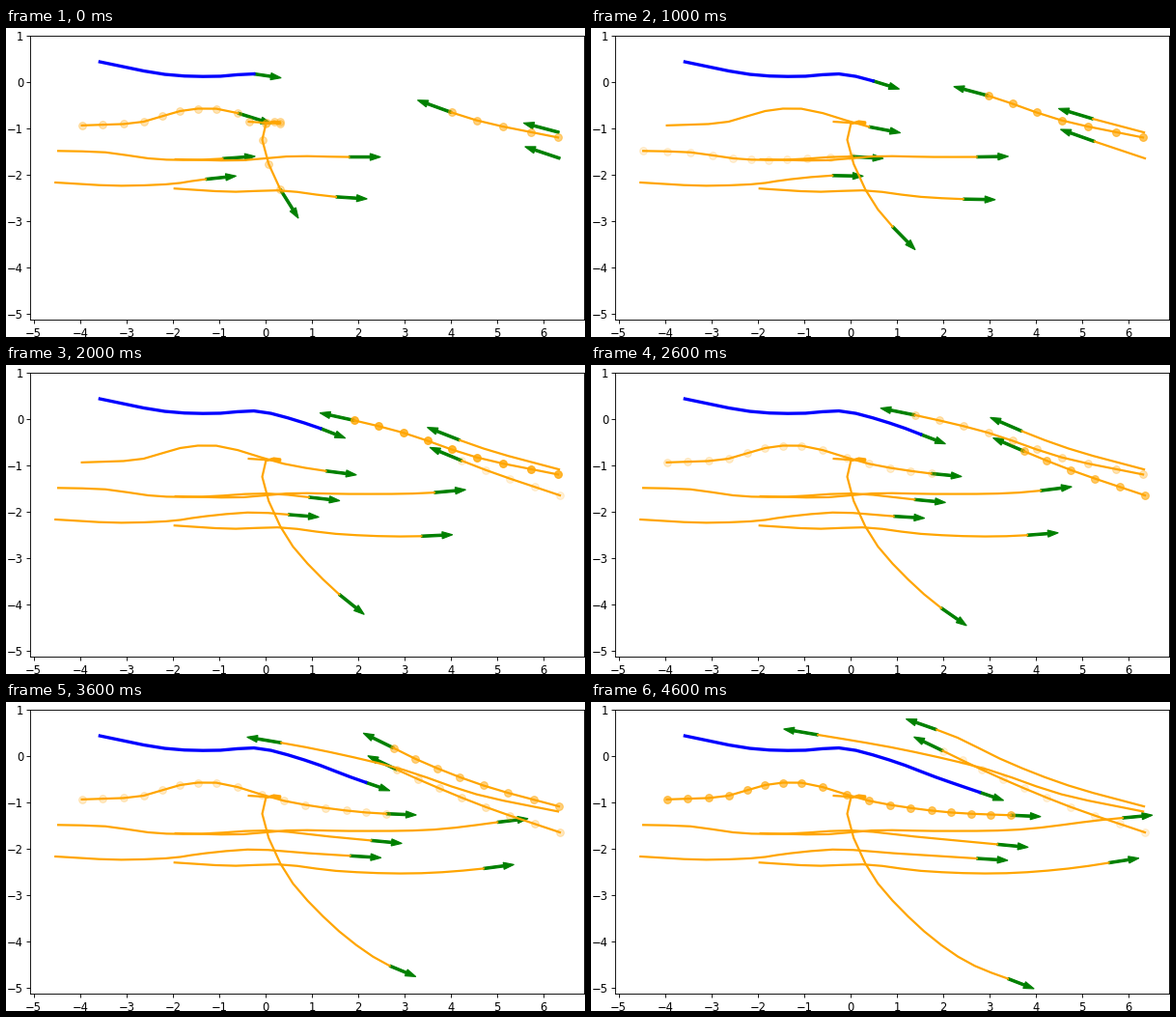
Animation, 600 px wide and 320 px high, one loop 5 s. Source, as a matplotlib script:

```python
import matplotlib.pyplot as plt
import numpy as np
from matplotlib.animation import FuncAnimation

W, H, DPI = 600, 320, 80
LEFT, RIGHT, TOP, BOTTOM = 25, 599.4, 8.15, 301.6   # plot box on the stage
X0, Y0, UNIT = 268.9, 56.2, 48.05                   # stage place of (0, 0), pixels per unit
LAST = 10                                           # final known step of every path

fig = plt.figure(figsize=(W / DPI, H / DPI), dpi=DPI, facecolor="white")
ax = fig.add_axes([LEFT / W, 1 - BOTTOM / H, (RIGHT - LEFT) / W, (BOTTOM - TOP) / H])
ax.set_xlim((LEFT - X0) / UNIT, (RIGHT - X0) / UNIT)
ax.set_ylim((Y0 - BOTTOM) / UNIT, (Y0 - TOP) / UNIT)
ax.set_xticks(range(-5, 7))
ax.set_yticks(range(-5, 2))
ax.tick_params(labelsize=10.4)
ax.tick_params(axis="x", pad=4.5)
ax.tick_params(axis="y", pad=2.8)


def smooth(t, knots, values):
    """Cubic Hermite curve through a few key values."""
    slope = np.gradient(values, knots)
    i = np.clip(np.searchsorted(knots, t, side="right") - 1, 0, len(knots) - 2)
    h = knots[i + 1] - knots[i]
    u = (t - knots[i]) / h
    rise = u * u * (3 - 2 * u)
    return (values[i] * (1 - rise) + values[i + 1] * rise
            + h * u * (1 - u) * (slope[i] * (1 - u) - slope[i + 1] * u))


class Agent:
    """A walker: trail so far, velocity arrow and attention dots.

    keys: (step, x, y) points of the path; steps below 0 are already walked.
    seen: (first step, last step, first weight, last weight) spans of attention.
    """

    def __init__(self, *keys, seen=(), color="orange", width=2):
        knots, xs, ys = np.array(keys, float).T
        self.first = keys[0][0]
        steps = np.arange(self.first, LAST + 1)
        self.path = np.column_stack([smooth(steps, knots, xs), smooth(steps, knots, ys)])
        self.seen = seen
        self.trail, = ax.plot([], [], color=color, lw=width)
        self.dots, = ax.plot([], [], "o", color=color, ms=7)
        self.arrow = ax.arrow(0, 0, 1, 0, width=0.05, color="green")

    def weight(self, step):
        for a, b, wa, wb in self.seen:
            if a <= step <= b:
                return np.interp(step, [a, b], [wa, wb]) if b > a else wa
        return 0

    def pose(self, step):
        now = step - self.first
        x, y = self.path[now]
        dx, dy = self.path[now + 1] - self.path[now]
        walked = self.path[:now + 1].T
        self.trail.set_data(*walked)
        self.dots.set_data(*walked)
        self.dots.set_alpha(self.weight(step))
        self.arrow.set_data(x=x, y=y, dx=dx, dy=dy)


agents = [
    Agent((-8, -3.57, 0.44), (-5, -2.17, 0.17), (-2, -0.97, 0.13), (0, -0.25, 0.18),
          (3, 0.84, -0.08), (6, 1.84, -0.45), (10, 3.09, -0.88), color="blue", width=3),
    # left to right
    Agent((-8, -3.96, -0.93), (-5, -2.63, -0.85), (-3, -1.84, -0.62), (-1, -1.06, -0.57),
          (2, 0.4, -0.96), (5, 1.74, -1.17), (10, 3.88, -1.29),
          seen=[(0, 1, 0.3, 0.2), (5, 5, 0.2, 0.2), (7, 9, 0.22, 0.62)]),
    Agent((-8, -4.47, -1.48), (-6, -3.45, -1.51), (-4, -2.53, -1.64), (-1, -1.38, -1.67),
          (2, 0.03, -1.6), (5, 1.38, -1.73), (10, 3.61, -1.94),
          seen=[(2, 2, 0.16, 0.16)]),
    Agent((-8, -1.94, -1.66), (-5, -0.47, -1.68), (-3, 0.45, -1.6), (0, 1.8, -1.61),
          (4, 3.64, -1.58), (8, 5.44, -1.37), (10, 6.29, -1.29)),
    Agent((-8, -4.53, -2.16), (-5, -3.11, -2.23), (-3, -2.15, -2.2), (0, -1.29, -2.09),
          (2, -0.39, -2.01), (5, 0.93, -2.09), (10, 3.17, -2.23)),
    Agent((-8, -1.96, -2.29), (-5, -0.64, -2.36), (-3, 0.26, -2.33), (0, 1.52, -2.47),
          (4, 3.36, -2.52), (7, 4.7, -2.42), (10, 6, -2.23)),
    # turning down
    Agent((-8, -0.36, -0.85), (-6, 0.32, -0.89), (-4, 0.18, -0.84), (-3, 0.01, -0.89),
          (-2, -0.07, -1.24), (0, 0.32, -2.31), (3, 1.24, -3.45), (6, 2.32, -4.32),
          (10, 3.75, -4.93), seen=[(0, 1, 0.35, 0.2)]),
    # right to left
    Agent((-4, 6.31, -1.19), (-1, 4.55, -0.82), (2, 2.97, -0.29), (5, 1.39, 0.09),
          (10, -1.22, 0.55),
          seen=[(0, 4, 0.5, 0.8), (5, 5, 0.3, 0.3), (8, 8, 0.3, 0.3)]),
    Agent((0, 6.33, -1.08), (3, 4.7, -0.63), (6, 3.22, -0.05), (8, 2.31, 0.4),
          (10, 1.41, 0.73), seen=[(7, 8, 0.5, 0.3)]),
    Agent((0, 6.35, -1.64), (3, 4.74, -1.09), (6, 3.28, -0.49), (10, 1.57, 0.32),
          seen=[(3, 4, 0.12, 0.15), (5, 6, 0.6, 0.9), (7, 7, 0.25, 0.25),
                (9, 9, 0.15, 0.15)]),
]


def update(frame):
    step = 2 * frame // 5                  # each pose is held for 3, then 2 ticks
    for agent in agents:
        agent.pose(step)
    return []


anim = FuncAnimation(fig, update, frames=25, interval=200, repeat=True, repeat_delay=0)
plt.show()
```
